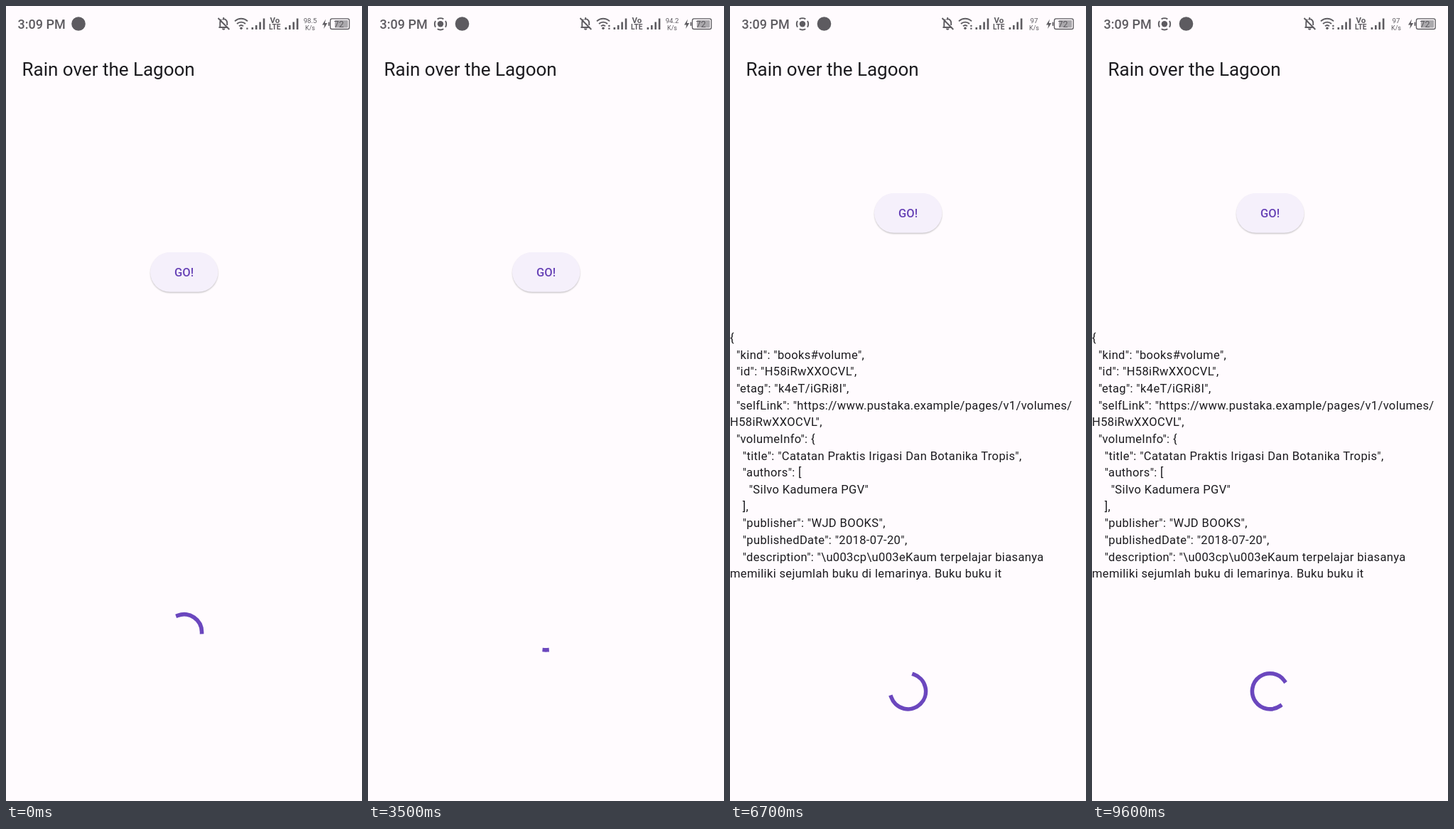
An HTML page for the animation above (9700 ms loop, 501 px wide and 1117 px high).

```html
<!DOCTYPE html>
<html lang="en">
<head>
<meta charset="utf-8">
<title>Loading demo</title>
<style>
  html, body { margin: 0; width: 100%; height: 100%; overflow: hidden; background: #fffbfe; }
  svg { display: block; width: 501px; height: 1117px; font-family: Roboto, sans-serif; }
  .status { fill: #5d5b60; }
  .line { fill: none; stroke: #5d5b60; stroke-width: 1.9; }
  .mid { text-anchor: middle; }
  #json { font-size: 16.55px; letter-spacing: .35px; fill: #1c1b1f; }
  #json text { white-space: pre; }
</style>
</head>
<body>
<svg viewBox="0 0 501 1117" xmlns="http://www.w3.org/2000/svg">
  <defs>
    <filter id="soft" x="-20%" y="-20%" width="140%" height="150%">
      <feGaussianBlur stdDeviation="1"/>
    </filter>
    <g id="bars">
      <path d="M0 30h2.6v3h-2.6z M5.4 27h2.6v6h-2.6z M10.8 22.5h2.6v10.5h-2.6z M16.2 17.5h2.6v15.5h-2.6z"/>
    </g>
  </defs>
  <rect width="501" height="1117" fill="#fffbfe"/>

  <g class="status">
    <text x="16.5" y="31.8" font-size="18" font-weight="500">3:09 PM</text>
    <g id="recorder">
      <circle cx="102" cy="25.3" r="4.2"/>
      <circle class="line" cx="102" cy="25.3" r="8.2" pathLength="360"
        stroke-dasharray="64 26" stroke-dashoffset="32"/>
    </g>
    <circle id="app" cy="25" r="9.8"/>

    <path class="line" d="M299.5 30h13 M301.3 29.5v-6c0-2 .7-3.6 1.8-4.6 M304.6 18.8c4-1.4 6.6 1.4 6.6 4.8v3.4 M306.2 18v-2 M298.5 17l15.8 16" stroke-width="1.6"/>
    <path d="M304 31.6h4.4a2.2 2.2 0 0 1-4.4 0z"/>
    <path class="line" d="M322 21.4a13 13 0 0 1 18 0 M325 25a8.8 8.8 0 0 1 12 0 M328 28.4a4.5 4.5 0 0 1 6 0"/>
    <circle cx="331" cy="31.3" r="1.8"/>
    <rect x="338.3" y="30.6" width="2.2" height="2.2"/>
    <rect id="uplink" x="338.3" y="26.8" width="2.2" height="2.2"/>
    <use href="#bars" x="345.5"/>
    <g class="mid" font-weight="700">
      <text x="378.3" y="23.6" font-size="11.5">Vo</text>
      <text x="378.3" y="33.3" font-size="10.2">LTE</text>
    </g>
    <use href="#bars" x="392.6"/>
    <g class="mid">
      <text id="speed" x="428" y="23.8" font-size="9.6"></text>
      <text x="428" y="34" font-size="9">K/s</text>
    </g>
    <path d="M450 18.5l-5 8h3.2l-1 5.5 5-8h-3.4z"/>
    <rect x="453.6" y="22.6" width="1.8" height="5.4" rx=".8"/>
    <rect x="456.4" y="17.9" width="26.8" height="14.6" rx="2.6" fill="none" stroke="#5d5b60" stroke-width="1.3"/>
    <rect x="462.8" y="20" width="18.4" height="10.4" rx="1" fill="#aaa8ac"/>
    <text class="mid" x="468.6" y="29.7" font-size="12.5">72</text>
  </g>

  <text x="22.5" y="97.6" font-size="26" fill="#1c1b1f">Rain over the Lagoon</text>

  <g id="button">
    <rect x="203.5" y="348" width="94.5" height="54.8" rx="27.4" fill="#000" opacity=".27" filter="url(#soft)"/>
    <rect x="203" y="346" width="95.4" height="55.8" rx="27.9" fill="#f5f0fb"/>
    <text class="mid" x="250.6" y="379.8" font-size="16.55" font-weight="500" letter-spacing=".1" fill="#6742b6">GO!</text>
  </g>

  <g id="json"></g>
  <path id="spinner" fill="none" stroke="#6b47be" stroke-width="5.57" stroke-linecap="square"/>
</svg>

<script>
const LOOP = 9700, STEP = 100;
const RECORDING = 500, UPLINK = 2500, FREEZE = 5100, SPEED = 5300, RESUME = 5800, LOADED = 6500;
const SHIFT = 83, LAG = 140;
const CX = 250.5, CY = 879.8, RADIUS = 25.05;

const response = String.raw`{
  "kind": "books#volume",
  "id": "H58iRwXXOCVL",
  "etag": "k4eT/iGRi8I",
  "selfLink": "https://www.pustaka.example/pages/v1/volumes/
H58iRwXXOCVL",
  "volumeInfo": {
    "title": "Catatan Praktis Irigasi Dan Botanika Tropis",
    "authors": [
      "Silvo Kadumera PGV"
    ],
    "publisher": "WJD BOOKS",
    "publishedDate": "2018-07-20",
    "description": "\u003cp\u003eKaum terpelajar biasanya
memiliki sejumlah buku di lemarinya. Buku buku it`;

const el = id => document.getElementById(id);
const show = (id, on) => el(id).setAttribute("visibility", on ? "visible" : "hidden");
const frac = x => x - Math.floor(x);
const clamp = x => Math.min(1, Math.max(0, x));

response.split("\n").forEach((line, i) => {
  const text = document.createElementNS("http://www.w3.org/2000/svg", "text");
  text.setAttribute("y", 472.1 + i * 23.65);
  text.textContent = line;
  el("json").append(text);
});

// cubic-bezier(.4, 0, .2, 1)
function ease(x) {
  if (x <= 0 || x >= 1) return clamp(x);
  let lo = 0, hi = 1, s;
  for (let i = 0; i < 24; i++) {
    s = (lo + hi) / 2;
    const bx = 1.2 * s * (1 - s) ** 2 + 0.6 * s * s * (1 - s) + s ** 3;
    if (bx < x) lo = s; else hi = s;
  }
  return s * s * (3 - 2 * s);
}

// The spinner stalls while the request is handled and then catches up.
function spinTime(t) {
  if (t < RECORDING) return t - LAG;
  if (t >= FREEZE && t < RESUME) return FREEZE;
  if (t >= RESUME && t < LOADED) return t - LAG;
  return t;
}

function arc(time, cy) {
  const phase = frac(time / 1333 + 0.2623);
  const turn = frac(time / 2222 + 0.967);
  const head = ease(clamp(phase * 2));
  const tail = ease(clamp(phase * 2 - 1));
  const start = Math.PI * (-0.5 + 1.5 * tail + 2 * turn + 0.5 * phase);
  const sweep = Math.max(1.5 * Math.PI * (head - tail), 0.001);
  const point = a => `${(CX + RADIUS * Math.cos(a)).toFixed(3)} ${(cy + RADIUS * Math.sin(a)).toFixed(3)}`;
  return `M${point(start)}A${RADIUS} ${RADIUS} 0 ${+(sweep > Math.PI)} 1 ${point(start + sweep)}`;
}

function draw(now) {
  const t = Math.floor((now % LOOP) / STEP) * STEP;
  const recording = t >= RECORDING, loaded = t >= LOADED;
  show("recorder", recording);
  show("uplink", t >= UPLINK);
  show("json", loaded);
  el("app").setAttribute("cx", recording ? 132.5 : 102);
  el("speed").textContent = t >= SPEED ? "97" : recording ? "94.2" : "98.5";
  el("button").setAttribute("transform", `translate(0 ${loaded ? -SHIFT : 0})`);
  el("spinner").setAttribute("d", arc(spinTime(t), CY + (loaded ? SHIFT : 0)));
}

function tick() {
  draw(performance.now());
  requestAnimationFrame(tick);
}
draw(0);
requestAnimationFrame(tick);
</script>
</body>
</html>
```
